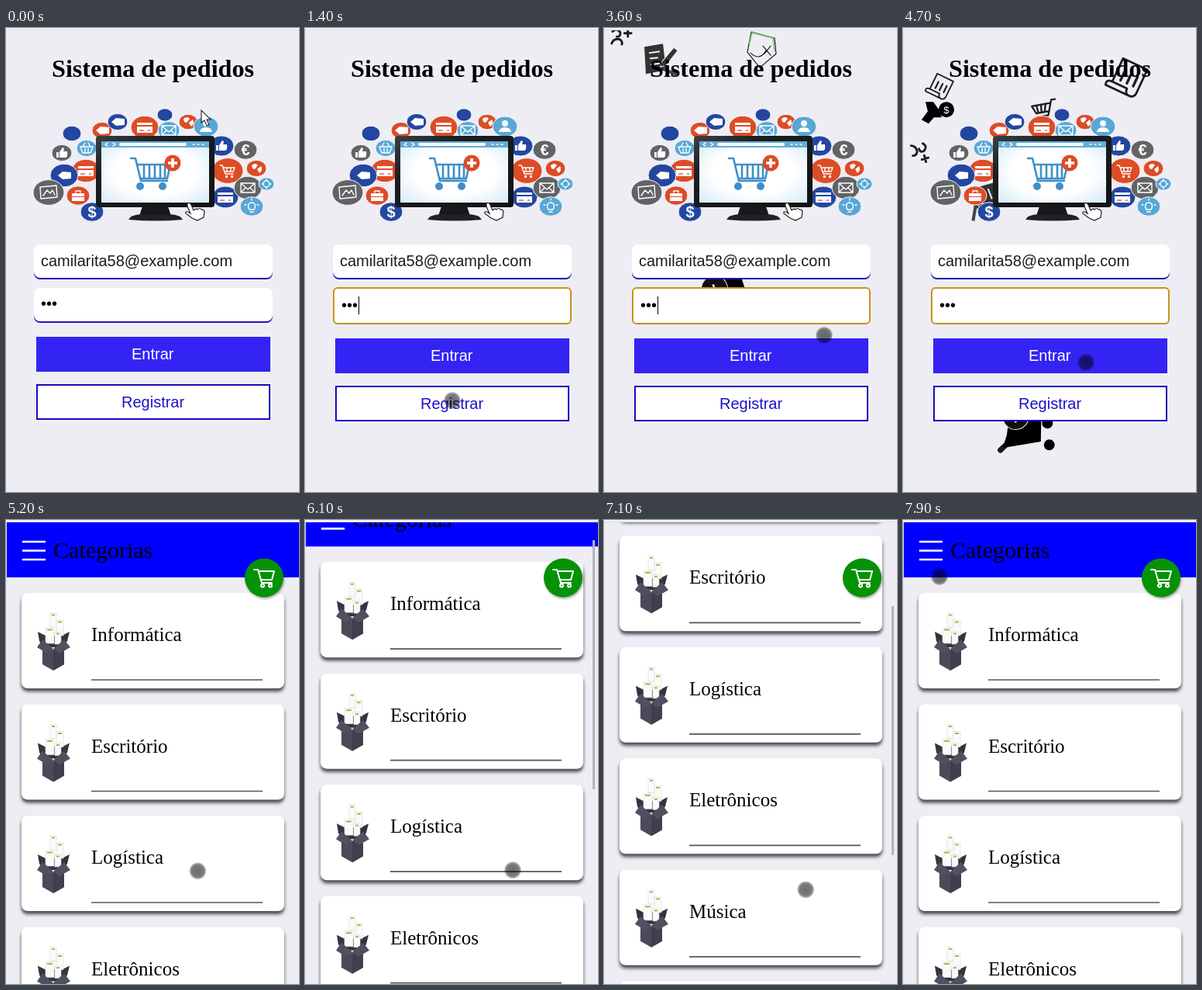
Recreate the animation shown at these times as an HTML page. Size 378 by 598 pixels, loop 8 s.

```html
<!DOCTYPE html>
<html lang="pt-BR">
<head>
<meta charset="utf-8">
<title>Sistema de pedidos</title>
<style>
html, body { margin: 0; width: 378px; height: 598px; overflow: hidden; background: #eeedf4; }
svg { display: block; }
.serif { font-family: "Liberation Serif", "Times New Roman", serif; }
.sans { font-family: "Liberation Sans", Arial, sans-serif; font-size: 20px; }
.line { fill: none; stroke-linecap: round; stroke-linejoin: round; }
.shade { filter: drop-shadow(0 4px 2px rgba(30, 30, 35, .8)); }
.soft { filter: drop-shadow(1px 2px 1.5px rgba(0, 0, 0, .35)); }
</style>
</head>
<body>
<svg id="stage" width="378" height="598" viewBox="0 0 378 598">
  <defs>
    <radialGradient id="glass" r=".75">
      <stop offset=".5" stop-color="#fff"/><stop offset="1" stop-color="#cfe8f6"/>
    </radialGradient>
    <linearGradient id="frame" x2="1" y2="1">
      <stop offset="0" stop-color="#3c4044"/><stop offset=".3" stop-color="#1b1d1f"/><stop offset="1" stop-color="#111214"/>
    </linearGradient>
    <radialGradient id="dot">
      <stop offset="0" stop-opacity=".58"/><stop offset=".7" stop-opacity=".52"/>
      <stop offset=".88" stop-opacity=".36"/><stop offset="1" stop-opacity=".1"/>
    </radialGradient>
  </defs>

  <g id="login">
    <g id="rain"></g>
    <text class="serif" x="59" y="63" font-size="32.2" font-weight="700">Sistema de pedidos</text>
    <g id="bubbles"></g>
    <g id="monitor">
      <path d="M176 230H209L213 242H172Z" fill="#17191b"/>
      <path d="M158 247Q160 241 175 240H211Q226 241 228 247Q193 250 158 247Z" fill="#1f2123"/>
      <rect x="116" y="139" width="153" height="92" rx="4" fill="url(#frame)"/>
      <rect x="123" y="146" width="139" height="79" fill="url(#glass)"/>
      <rect x="123" y="146" width="139" height="8" fill="#64acd6"/>
      <rect x="146" y="148" width="87" height="4" rx="2" fill="#f4fbff"/>
      <path d="M131 148L128 150L131 152M138 148L141 150L138 152M241 150h2M247 150h2M253 150h2" class="line" stroke="#fff" stroke-width="1.5"/>
      <path d="M161 168H167L174 197H208M169 176H212L208 194H174M178 176V194M185 176V194M192 176V194M199 176V194M205 176V194" class="line" stroke="#3f8fc9" stroke-width="2.6"/>
      <circle cx="173" cy="204" r="5" fill="#3f8fc9"/><circle cx="202" cy="204" r="5" fill="#3f8fc9"/>
      <circle cx="215" cy="174" r="10.5" fill="#e04a24"/>
      <path d="M215 168V180M209 174H221" stroke="#fff" stroke-width="3.6"/>
      <path d="M234 226Q237 224 239 228L242 235Q245 232 247 234Q250 231 252 234Q255 233 256 237L255 244L247 248L240 245L232 239Q231 236 235 237L238 239L234 230Z" fill="#fff" stroke="#222" stroke-width="1.2"/>
    </g>

    <rect x="36" y="282" width="308" height="42" rx="8" fill="#2114ba"/>
    <rect x="36" y="279" width="308" height="43" rx="8" fill="#fff"/>
    <text class="sans" x="45" y="307" fill="#1c1c1c">camilarita58@example.com</text>
    <g id="idle">
      <rect x="36" y="338" width="308" height="42" rx="8" fill="#2114ba"/>
      <rect x="36" y="335" width="308" height="43" rx="8" fill="#fff"/>
      <text class="sans" x="45" y="362">•••</text>
    </g>
    <g id="focus">
      <rect x="37" y="335" width="306" height="46" rx="5" fill="#fff" stroke="#c8921c" stroke-width="2"/>
      <text class="sans" x="47" y="364">•••</text>
      <rect id="caret" x="69" y="346" width="1" height="23"/>
    </g>
    <g id="buttons">
      <rect x="39" y="398" width="302" height="45" fill="#3324f3"/>
      <text class="sans" x="162" y="427" fill="#fff">Entrar</text>
      <rect x="40" y="460" width="300" height="44" fill="#fff" stroke="#1508bd" stroke-width="2"/>
      <text class="sans" x="149" y="489" fill="#1d10c6">Registrar</text>
    </g>
  </g>

  <g id="shop">
    <g id="list">
      <rect y="3" width="378" height="71" fill="#00f"/>
      <path d="M21 28H51M21 39.5H51M21 51H51" stroke="#fff" stroke-width="2.6"/>
      <text class="serif" x="61" y="49" font-size="30">Categorias</text>
    </g>
    <rect id="thumb" x="371" width="3" height="321" fill="#b4b4ba"/>
    <g class="soft"><circle cx="333" cy="74.5" r="25" fill="#069206"/></g>
    <g class="line" stroke="#fff" stroke-width="2">
      <path d="M320 64H325L330 81H343M326 66H346L343 77H329"/>
      <circle cx="331" cy="84.5" r="2"/><circle cx="341" cy="84.5" r="2"/>
    </g>
  </g>

  <rect width="378" height="3" fill="#f6f6f8"/>
  <path d="M0 2.5H378" stroke="#dcdce1"/>
  <path d="M.5 3V598" stroke="#e2e1e8"/>
  <path id="arrow" d="M252 106V122L256 119L259 126L262 125L259 118H264Z" fill="#fff" stroke="#222" stroke-width="1.1"/>
  <circle id="touch" r="11" fill="url(#dot)"/>
</svg>
<script>
const LOOP = 8000, FOCUS = 500, ENTER = 5000;
const $ = id => document.getElementById(id);
const show = (id, on) => $(id).setAttribute("visibility", on ? "inherit" : "hidden");
const move = (el, x, y, turn = 0, size = 1) =>
  el.setAttribute("transform", `translate(${x} ${y}) rotate(${turn}) scale(${size})`);
const ease = (t, from, to) => {
  const k = Math.min(1, Math.max(0, (t - from) / (to - from)));
  return k * k * (3 - 2 * k);
};

// White signs inside the bubbles, drawn around 0,0
const stroke = d => `<path d="${d}" class="line" stroke="#fff" stroke-width="1.4"/>`;
const fill = d => `<path d="${d}" fill="#fff"/>`;
const letter = s => `<text class="sans" y="7" text-anchor="middle" font-weight="700" fill="#fff">${s}</text>`;
const signs = {
  none: "",
  card: fill("M-10 -6H10V-3H-10ZM-10 -1H10V7H-10Z") + `<path d="M-7 4H-1M4 4H7" stroke="#d66" stroke-width="1.3"/>`,
  mail: stroke("M-9 -6H9V6H-9ZM-9 -6L0 2L9 -6M-9 6L-3 0M9 6L3 0"),
  globe: fill("M-6 -4Q-1 -8 2 -4L-2 1L-5 0ZM1 1L6 -3Q9 2 4 6Z"),
  person: fill("M-4 -4a4 4 0 1 1 8 0a4 4 0 1 1 -8 0M-8 7Q-7 1 0 1Q7 1 8 7Z"),
  thumb: fill("M-7 -1H-4V6H-7ZM-3 -1L1 -7Q4 -7 2 -2H7Q8 5 5 6H-3Z"),
  basket: stroke("M-8 -2H8L5 6H-5ZM-5 -2L-2 -7M5 -2L2 -7M-2 0V5M2 0V5"),
  tag: fill("M-8 0L-2 -5L9 -4V4L-2 5Z"),
  photo: stroke("M-11 -7L10 -9L11 6L-10 8ZM-7 4L-2 -3L2 1L5 -3L8 3"),
  bag: fill("M-8 -3H8V1H-8ZM-8 2H8V7H-8Z") + stroke("M-3 -4V-6H3V-4"),
  dollar: letter("$"),
  euro: letter("€"),
  cart: stroke("M-10 -7H-7L-3 4H7M-6 -4H9L7 1H-4M-1 -4V1M4 -4V1") + fill("M-3 6h3v3h-3zM4 6h3v3h-3z"),
  gear: stroke("M-4 0a4 4 0 1 1 8 0a4 4 0 1 1 -8 0M0 -6V-4M0 4V6M-6 0H-4M4 0H6"),
  bulb: stroke("M-3 4Q-6 -1 -3 -4Q0 -6 3 -4Q6 -1 3 4ZM-2 7H2M-9 -2H-7M7 -2H9M0 -10V-8")
};
const red = "#dd4c26", navy = "#2347a0", sky = "#58a7d5", grey = "#626365";
const bubble = (sign, color, x, y, r) =>
  `<g transform="translate(${x} ${y})"><ellipse rx="${r}" ry="${r * .82}" fill="${color}" stroke="#f8f8fb"/>${signs[sign]}</g>`;
$("bubbles").innerHTML = [
  bubble("none", navy, 85, 136, 12), bubble("tag", red, 124, 132, 13), bubble("tag", navy, 144, 121, 13),
  bubble("none", navy, 205, 112, 10), bubble("card", red, 179, 128, 18), bubble("mail", sky, 210, 132, 14),
  bubble("globe", red, 235, 121, 12), bubble("person", sky, 258, 127, 16), bubble("thumb", grey, 72, 161, 13),
  bubble("basket", sky, 104, 155, 13), bubble("card", red, 103, 184, 18), bubble("tag", navy, 75, 190, 18),
  bubble("photo", grey, 55, 212, 20), bubble("bag", red, 93, 216, 15), bubble("dollar", navy, 111, 237, 15),
  bubble("thumb", navy, 278, 152, 16), bubble("euro", grey, 309, 157, 15), bubble("cart", red, 286, 184, 20),
  bubble("globe", red, 323, 181, 13), bubble("card", navy, 283, 218, 17), bubble("mail", grey, 312, 206, 18),
  bubble("gear", sky, 336, 201, 10), bubble("bulb", sky, 317, 230, 15)
].join("");

// Dark icons that tumble down behind the form
const ink = (d, w = 2) => `<path d="${d}" class="line" stroke="#1b1b1b" stroke-width="${w}"/>`;
const icons = {
  trolley: ink("M-22 -36L-16 -30", 7) +
    `<path d="M-19 -33L-10 16H18L24 3L15 -6L17 -26L-2 -28Z"/>
     <circle cx="-14" cy="27" r="7"/><circle cx="14" cy="24" r="7"/>
     <circle cx="22" cy="-17" r="17" fill="#111" stroke="#eeedf4"/>
     <path d="M14 -17H22L23 -11" fill="none" stroke="#fff" stroke-width="2.5"/>`,
  add: ink("M-10 -6Q-5 -11 -1 -5Q0 0 -5 0M-11 8Q-9 2 -2 3Q2 5 1 9M8 -8V0M4 -4H12", 2.6),
  note: `<path d="M-20 -16L4 -20L8 14L-18 19Z" fill="#333"/>
    <path d="M-14 -8L0 -10M-13 -1L-2 -2M-12 7L3 5" stroke="#eeedf4" stroke-width="2"/>
    <path d="M2 4L18 -15L23 -11L8 8L1 10Z" fill="#333" stroke="#eeedf4"/><path d="M5 13L22 20" stroke="#444" stroke-width="4"/>`,
  label: ink("M-18 4L-13 -22L17 -14L19 6L-2 24Z", 1.2) +
    `<path d="M-15 -8L-12 -21L15 -14L17 2" class="line" stroke="#80d078" stroke-width="1.8"/>` + ink("M-14 5Q-2 16 6 2M2 -4L12 8M12 -4L4 6", 1.2),
  hand: `<circle cx="10" cy="-1" r="10"/><text class="sans" x="10" y="4" text-anchor="middle" style="font-size:13px" fill="#fff">$</text>
    <path d="M-17 -11L-7 -11L1 0L4 9L-6 9L-13 17L-22 12L-14 1Z"/>`,
  cart: ink("M16 -10H11L4 9H-12M9 -6H-15L-11 4H6M3 -6L0 4M-3 -6L-4 4M-9 -6L-8 4", 2.3) + `<circle cx="2" cy="13" r="2.6"/><circle cx="-10" cy="13" r="2.6"/>`,
  receipt: ink("M-11 -14H12V8Q12 13 7 13H-15Q-17 8 -11 8ZM-11 8H3Q3 13 7 13", 1.8) + ink("M-5 -5V4M1 -5V4M7 -5V4", 2.2)
};
// Each icon passes x,y at time t; speed, drift and spin are per ms
const falls = [
  { name: "trolley", t: 2600, x: 162, y: 76, turn: 82, speed: .265, spin: .09 },
  { name: "add", t: 3600, x: 22, y: 11, speed: .152, spin: .068, size: 1.1 },
  { name: "note", t: 3600, x: 72, y: 40, speed: .185, spin: .07, drift: .03 },
  { name: "label", t: 3600, x: 203, y: 27, spin: .06 },
  { name: "receipt", t: 4700, x: 48, y: 76, turn: 26 },
  { name: "hand", t: 4700, x: 46, y: 106 },
  { name: "cart", t: 4700, x: 182, y: 104, turn: -10 },
  { name: "receipt", t: 4700, x: 290, y: 65, turn: 25, size: 1.5 }
];
const DRAG = 9.4e-5;
$("rain").innerHTML = falls.map(f => `<g>${icons[f.name]}</g>`).join("");

function fall({ t: t0, x, y, turn = 0, speed = .16, drift = 0, spin = .06, size = 1 }, i, t) {
  const dt = t - t0;
  move($("rain").children[i], x + drift * dt, y + speed * dt * (1 - DRAG * dt), turn + spin * dt, size);
}

const paper = (x, y, w, h) =>
  `<path d="M${x} ${y}h${w}v${h}h${-w}z" fill="#fafafa" stroke="#ddd" stroke-width=".7"/>
   <path d="M${x + 2} ${y + 2.5}h${w - 4}" stroke="#8cc63f" stroke-width="2"/>`;
const box = `<path d="M41 50L51 55L72 55L82 50L79 62L74 70H48L43 62Z" fill="#34333f"/>` +
  paper(57, 26, 8, 18) + paper(65, 35, 9, 20) + paper(51, 45, 11, 20) + paper(63, 50, 8, 16) +
  `<path d="M47 68L61 73L75 68V92L61 100L47 92Z" fill="#4b4a59"/>
   <path d="M61 73L75 68V92L61 100Z" fill="#403f4d"/>
   <path d="M47 60L61 72L53 78L40 70ZM75 60L61 72L69 78L83 70Z" fill="#515060"/>`;
const names = ["Informática", "Escritório", "Logística", "Eletrônicos", "Música", ""];
$("list").insertAdjacentHTML("beforeend", names.map((name, i) =>
  `<g transform="translate(0 ${94 + i * 143.5})">
    <rect class="shade" x="20" width="339" height="123" rx="8" fill="#fff"/>${box}
    <text class="serif" x="110" y="62" font-size="25">${name}</text>
    <path d="M110 112H331" stroke="#565656" stroke-width="1.6"/>
  </g>`).join(""));

// Time, x and y of the places the pointer visits
const stops = [
  [100, 255, 125], [500, 215, 350], [1400, 190, 480], [2600, 275, 420], [3600, 284, 396],
  [4700, 236, 431], [5000, 236, 431], [5500, 268, 491], [7000, 268, 491], [7900, 47, 73]
];
function pointer(t) {
  const i = Math.max(1, stops.findIndex(s => s[0] >= t));
  const [t0, x0, y0] = stops[i - 1], [t1, x1, y1] = stops[i];
  const k = ease(t, t0, t1);
  return [x0 + (x1 - x0) * k, y0 + (y1 - y0) * k];
}
const scroll = t => 221 * (ease(t, 5860, 6750) - ease(t, 7050, 7700));

function draw(t) {
  const inside = t >= ENTER, focused = t >= FOCUS, top = scroll(t);
  show("login", !inside);
  show("shop", inside);
  show("arrow", t < 100);
  show("touch", t >= 100 && (t < 6400 || t > 7000));
  const [x, y] = pointer(Math.min(t, 7900));
  move($("touch"), x, t < 7000 ? y - top : y);

  show("idle", !focused);
  show("focus", focused);
  show("caret", focused && (t + 850) % 1000 < 500);
  move($("buttons"), 0, focused ? 2 : 0);
  falls.forEach((f, i) => fall(f, i, t));

  move($("list"), 0, -top);
  show("thumb", inside && t > 5860 && t < 7800);
  $("thumb").setAttribute("y", 7 + top * .478);
}

const start = performance.now();
function tick() {
  draw((performance.now() - start) % LOOP);
  requestAnimationFrame(tick);
}
draw(0);
requestAnimationFrame(tick);
</script>
</body>
</html>
```
